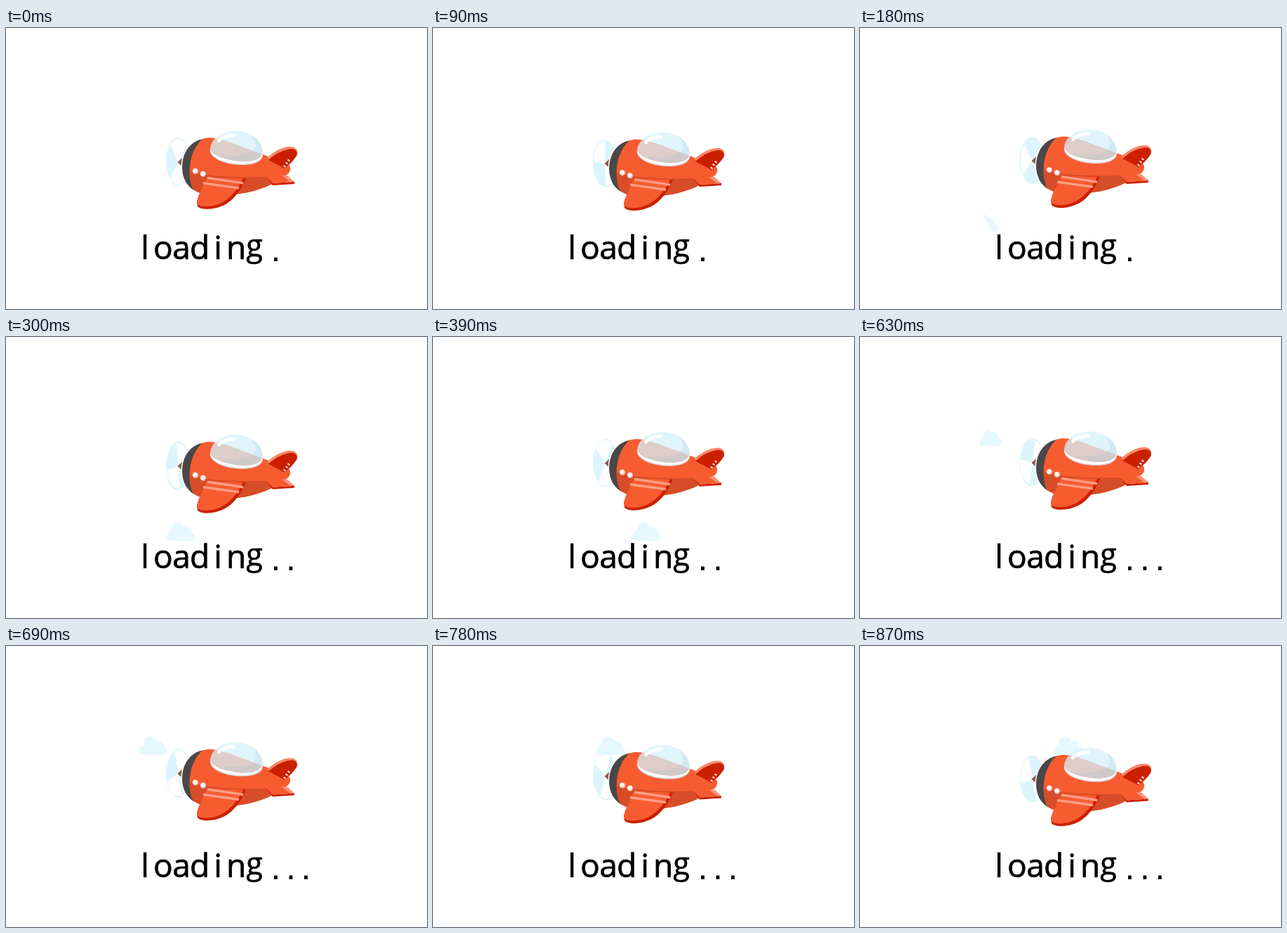
These frames come from a looping animation (600x400 px, 0.9 s). An HTML page:

```html
<!DOCTYPE html>
<html lang="en">
<head>
<meta charset="utf-8">
<title>Loading</title>
<style>
  html, body { margin: 0; width: 100%; height: 100%; overflow: hidden; background: #fff; }
  svg { display: block; }
  text { text-anchor: middle; }
  #word { font: 46px "Open Sans", sans-serif; stroke: #000; stroke-width: .7px; }
  #word tspan { font-size: 43px; }
  #dots { font: 50px "Liberation Sans", sans-serif; }
</style>
</head>
<body>
<svg width="600" height="400" viewBox="0 0 600 400">
  <defs>
    <clipPath id="porthole"><circle cx="304" cy="204" r="143"/></clipPath>
    <!-- centred on x, top edge at y = 0 -->
    <g id="cloud" fill="#e6f8ff">
      <circle cx="-4" cy="9.5" r="9.5"/>
      <circle cx="-13" cy="18" r="6"/>
      <circle cx="8" cy="14" r="8"/>
      <rect x="-20.5" y="15" width="41" height="11" rx="5.5"/>
    </g>
  </defs>

  <g clip-path="url(#porthole)">
    <use id="lowCloud" href="#cloud"/>
    <use id="highCloud" href="#cloud"/>
  </g>

  <g id="plane">
    <g transform="translate(245.500 190.500) scale(17.500 33.500)">
      <g id="propeller">
        <path d="M0 0L-.67 -.74A1 1 0 0 0 -.67 .74ZM0 0L.67 -.74A1 1 0 0 1 .67 .74Z" fill="#dcf4fd"/>
        <path d="M-.67 -.74A1 1 0 0 1 .67 -.74M-.67 .74A1 1 0 0 0 .67 .74"
              fill="none" stroke="#c9eefa" vector-effect="non-scaling-stroke"/>
      </g>
    </g>
    <path d="M244.500 191L251 185V197Z" fill="#8d5a43"/>

    <!-- cowling and fuselage -->
    <path d="M281 158C262 161 251 178 251 198C251 214 258 225 268 231L275 200Z"
          fill="#4b4748" stroke="#fff" stroke-width="3" paint-order="stroke"/>
    <path d="M280 158C292 154 305 158 320 163L374 183L404 196C407 201 404 208 398 210L381 221C360 232 335 238 300 238C283 238 274 235 267 230C262 220 261 208 262 196C264 180 270 167 280 158Z"
          fill="#f65c30"/>
    <path d="M261.500 204C290 212 330 213 372 212L381 221C360 232 335 238 300 238C283 238 274 235 267 230C263 222 262 213 261.500 204Z"
          fill="#d74d28"/>

    <!-- tail -->
    <path d="M372 185C385 173 398 168 407 169C414 170 416 174 415 181L398 199Z" fill="#f98768"/>
    <path d="M374 188C386 177 399 172 408 172C414 173 416 177 414 182C410 189 403 195 397 200Z" fill="#cb2000"/>
    <path d="M395.500 196l3 2M398.500 191.500l3 2M401.500 187.500l3 2" stroke="#fbe3dc" stroke-width="2"/>
    <path d="M370 211L380 221L411 219V222L380 224Z" fill="#cb2000"/>
    <path d="M370 211L395 209L411 219L380 221Z" fill="#f65c30"/>
    <path d="M393 210H401L411 219H405Z" fill="#fa9377"/>

    <!-- wing -->
    <path d="M287 212L342 214C336 229 325 245 311 252C297 259 279 260 273 254L272 247Z" fill="#cb2000"/>
    <path d="M287 212L338 214C331 228 321 242 307 249C295 255 278 256 273 251C271 246 274 239 278 231Z" fill="#f65c30"/>
    <path d="M287 213.500L338 221M281 221L332 228" stroke="#ff9d85" stroke-width="3.500"/>

    <!-- rivets -->
    <g fill="#d9b9b3"><circle cx="270" cy="204" r="4.200"/><circle cx="281" cy="208" r="4.200"/></g>
    <g fill="#fff3f1"><circle cx="269.500" cy="203.300" r="3.200"/><circle cx="280.500" cy="207.300" r="3.200"/></g>

    <!-- canopy: glass, shaded side, rim, highlight -->
    <path d="M291 171C293 156 309 146.500 328 146.500C348 146.500 365 160 366 177C364 188 350 191 334 190C312 188 292 181 291 171Z"
          fill="#d6f1fb" opacity=".76"/>
    <path d="M350 152C360 158 365 167 366 177C364 188 350 191 334 190C322 189 312 186 304 181C330 184 372 182 350 152Z"
          fill="#8fb8c8" opacity=".18"/>
    <path d="M291 171C288 185 311 195 337 195C356 195 368 189 366 177C364 188 350 191 334 190C312 188 292 181 291 171Z"
          fill="#dcd8e0"/>
    <path d="M291 171C290 184 311 193 337 193.500C356 193 367 187 366 177C364 188 350 191 334 190C312 188 292 181 291 171Z"
          fill="#fff"/>
    <path d="M303.500 160.500l.5-.5M308 157Q315 152.500 325 152.500" fill="none"
          stroke="#fff" stroke-width="5" stroke-linecap="round"/>
  </g>

  <text id="word" y="329" x="198 224 250 276 302 328">loadin<tspan x="354" y="325">g</tspan></text>
  <text id="dots" y="332" x="384.500 406 427.500"></text>
</svg>

<script>
  const LOOP = 900, STEP = 30;
  const part = id => document.getElementById(id);
  const move = (id, x, y) => part(id).setAttribute('transform', `translate(${x} ${y})`);

  // Triangle wave: lowest (+3) at 70 ms, highest (-17) half a loop later
  function bob(t) {
    const phase = (t - 70 + LOOP) % LOOP / LOOP;
    return 3 - 20 * (1 - Math.abs(1 - 2 * phase));
  }

  function draw(now) {
    const t = Math.floor(now % LOOP / STEP) * STEP;
    move('plane', 0, bob(t));
    move('lowCloud', 304 + 0.608 * (t - 390), 264);
    move('highCloud', 253 + 0.48 * (t - 780), 129);
    part('propeller').setAttribute('transform', `rotate(${-14.5 * t / STEP})`);
    part('dots').textContent = '.'.repeat(t < 300 ? 1 : t < 450 ? 2 : 3);
  }

  const start = performance.now();
  function tick() {
    draw(performance.now() - start);
    requestAnimationFrame(tick);
  }
  tick();
</script>
</body>
</html>
```
